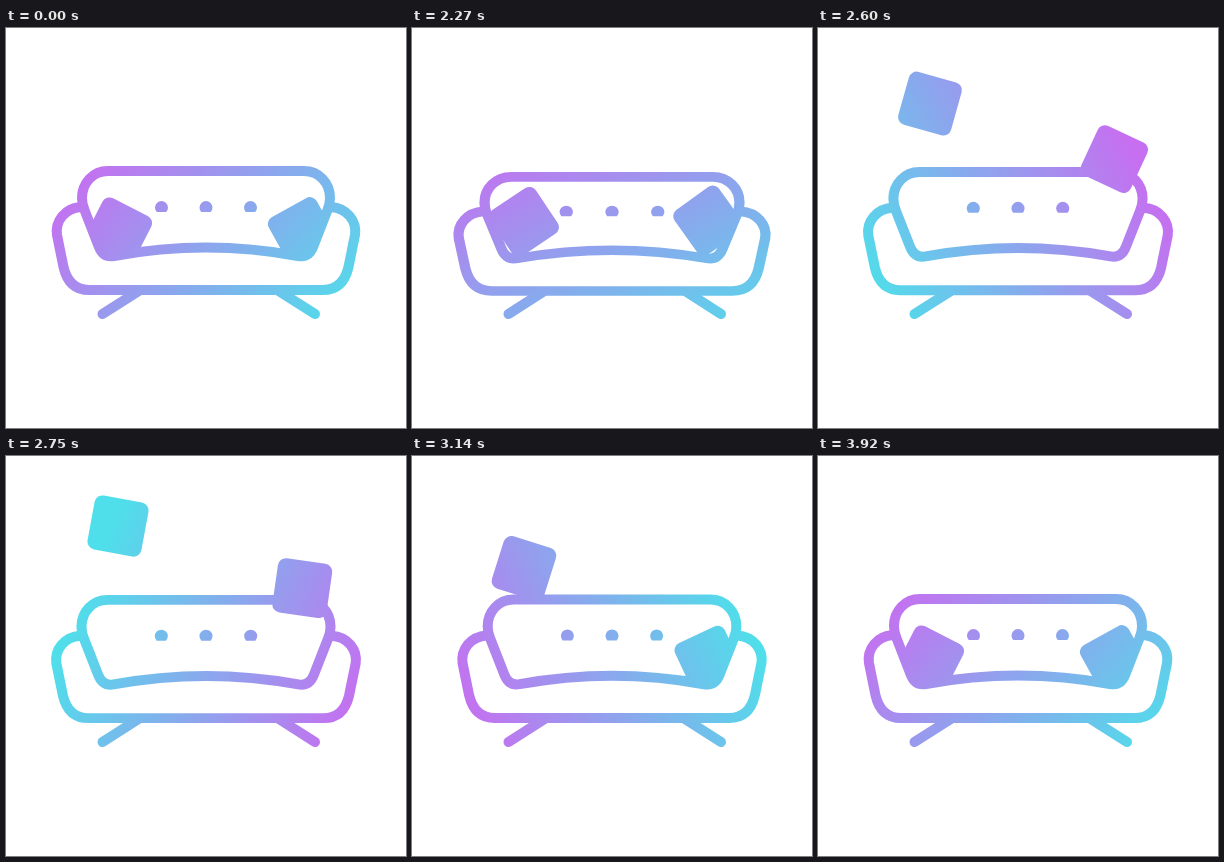
Recreate the animation shown at these times as an HTML page. Size 400 by 400 pixels, loop 3.98 s.

```html
<!DOCTYPE html>
<html lang="en">
<head>
<meta charset="utf-8">
<title>Sofa</title>
<style>
  html, body { margin: 0; width: 100%; height: 100%; overflow: hidden; background: #fff; }
  svg { display: block; width: 100vw; height: 100vh; }
</style>
</head>
<body>
<svg viewBox="0 0 400 400">
  <defs>
    <linearGradient id="tint" gradientUnits="userSpaceOnUse" x1="50" y1="225" x2="350" y2="225">
      <stop offset="0" stop-color="#c66ff0"/>
      <stop offset="1" stop-color="#4fdfea"/>
    </linearGradient>
    <path id="back" d="M102 143H298C313 143 324 155 324 170Q324 176 321.500 182L307.500 218Q303 230 292 228Q200 211 108 228Q97 230 92.500 218L78.500 182Q76 176 76 170C76 155 87 143 102 143Z"/>
    <path id="dot" d="M-4.700 4.500A6.500 6.500 0 1 1 4.700 4.500Z"/>
    <rect id="cushion" x="-27.400" y="-27.400" width="54.800" height="54.800" rx="8"/>
    <clipPath id="seat">
      <rect class="squash" y="-200" width="400" height="378"/>
      <use class="squash" href="#back"/>
    </clipPath>
    <mask id="shape" maskUnits="userSpaceOnUse" x="0" y="0" width="400" height="400">
      <g fill="none" stroke="#fff" stroke-width="10" stroke-linecap="round" stroke-linejoin="round">
        <g class="squash">
          <use href="#back"/>
          <path d="M75 179C59 180 49 193 51 207L57.500 239C61 254 69 262 83 262H317C331 262 339 254 342.500 239L349 207C351 193 341 180 325 179"/>
        </g>
        <path id="legs"/>
      </g>
      <g fill="#fff">
        <g class="squash">
          <use href="#dot" x="155.500" y="179.500"/>
          <use href="#dot" x="200" y="179.500"/>
          <use href="#dot" x="244.500" y="179.500"/>
        </g>
        <g clip-path="url(#seat)">
          <use id="left" href="#cushion"/>
          <use id="right" href="#cushion"/>
        </g>
      </g>
    </mask>
  </defs>
  <rect width="400" height="400" fill="url(#tint)" mask="url(#shape)"/>
</svg>
<script>
const LOOP = 3980, STEP = 30, START = 2030, FLOOR = 286, SEAT = 203.5;

const progress = (t, from, to) => Math.min(1, Math.max(0, (t - from) / (to - from)));
const easeInOut = u => (1 - Math.cos(Math.PI * u)) / 2;
const backOut = (u, pull = 2.5) => 1 + (pull + 1) * (u - 1) ** 3 + pull * (u - 1) ** 2;

// Height of a jump between 0 and 1, highest at `peak`
const hop = (t, peak, half) => Math.max(0, 1 - Math.abs((t - peak) / half) ** 3);

// The sofa is pressed down, then springs back and rings out
function squash(t, release = 2250) {
  if (t < release) return easeInOut(progress(t, 2000, release));
  const dt = t - release;
  return Math.exp(-dt / 380) * Math.cos(2 * Math.PI * dt / 430);
}

const byId = id => document.getElementById(id);
const place = (el, transform) => el.setAttribute("transform", transform);
const squashed = document.querySelectorAll(".squash");

function placeCushion(id, x, lift, angle) {
  place(byId(id), `translate(${x} ${SEAT - lift}) rotate(${angle})`);
}

function draw(t) {
  const q = squash(t), sx = 1 + .031 * q, sy = 1 - .045 * q;
  for (const el of squashed) {
    place(el, `translate(200 ${FLOOR}) scale(${sx} ${sy}) translate(-200 ${-FLOOR})`);
  }

  const hipY = FLOOR - 23 * sy;
  const leg = side => `M${202.75 + 106.25 * side} ${FLOOR}L${202.75 + 70 * side * sx} ${hipY}`;
  byId("legs").setAttribute("d", leg(-1) + leg(1));

  placeCushion("left", 112, 133.5 * hop(t, 2782, 525), 27 - 90 * backOut(progress(t, 2040, 3520)));
  placeCushion("right", 296.3, 72.5 * hop(t, 2650, 401), -29 - 90 * easeInOut(progress(t, 2050, 3310)));

  const turn = 42 + 360 * easeInOut(progress(t, 2030, 3570));
  byId("tint").setAttribute("gradientTransform", `rotate(${turn} 200 225)`);
}

const origin = performance.now();
function tick() {
  const t = (performance.now() - origin) % LOOP;
  draw(t < START ? 0 : START + Math.floor((t - START) / STEP) * STEP);
  requestAnimationFrame(tick);
}
tick();
</script>
</body>
</html>
```
